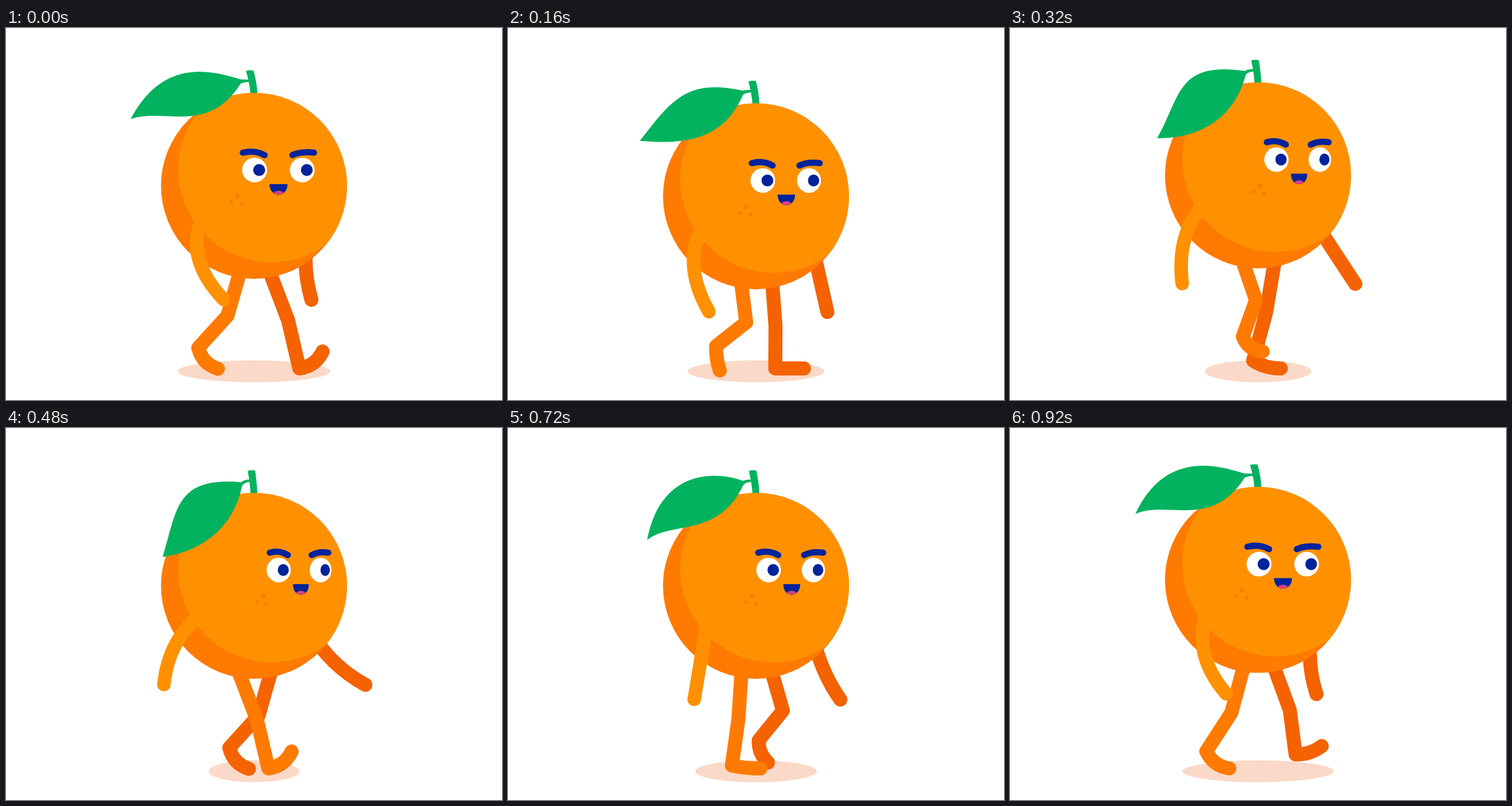
These frames come from a looping animation (864x648 px, 0.96 s). An HTML page:

```html
<!DOCTYPE html>
<html lang="en">
<head>
<meta charset="utf-8">
<title>Walking orange</title>
<style>
html, body { margin: 0; width: 100%; height: 100%; overflow: hidden; background: #fff; }
svg { display: block; width: 100vw; height: 100vh; }
.limb { fill: none; stroke-width: 24.4; stroke-linecap: round; stroke-linejoin: round; }
.far { stroke: #f56200; }
.near { stroke: #ff7a00; }
.arm { stroke: #ff9100; stroke-width: 23.6; }
.brow { fill: none; stroke: #00239c; stroke-width: 10.8; stroke-linecap: round; }
.navy { fill: #00239c; }
.leaf { fill: #03b25e; }
.dot { fill: #ff7a00; }
</style>
</head>
<body>
<svg viewBox="0 0 864 648">
  <defs>
    <clipPath id="skin"><circle cx="432" cy="273.5" r="162"/></clipPath>
    <clipPath id="lips"><path id="lipShape"/></clipPath>
  </defs>
  <ellipse id="shadow" cx="432" cy="598" ry="19" fill="#fbd9c8"/>
  <path id="farArm" class="limb far"/>
  <path id="farLeg" class="limb far"/>
  <path id="nearLeg" class="limb near"/>
  <g id="body">
    <path id="stem" class="leaf"/>
    <circle cx="432" cy="273.5" r="162" fill="#ff7a00"/>
    <circle cx="462" cy="245" r="162" fill="#ff9100" clip-path="url(#skin)"/>
    <path id="leaf" class="leaf"/>
    <ellipse id="eyeL" cy="246" ry="21.5" fill="#fff"/>
    <ellipse id="eyeR" cy="246" ry="21.5" fill="#fff"/>
    <ellipse id="pupilL" class="navy" cy="246" ry="10.4"/>
    <ellipse id="pupilR" class="navy" cy="246" ry="10.4"/>
    <path id="browL" class="brow"/>
    <path id="browR" class="brow"/>
    <path id="mouth" class="navy"/>
    <ellipse id="tongue" cy="289.5" ry="7.5" fill="#d4437c" clip-path="url(#lips)"/>
    <circle id="dot1" class="dot" cy="291.5" r="4"/>
    <circle id="dot2" class="dot" cy="302.3" r="2.8"/>
    <circle id="dot3" class="dot" cy="304.5" r="3.5"/>
    <path id="nearArm" class="limb arm"/>
  </g>
</svg>
<script>
const STEP = 40, CYCLE = 24, HALF = CYCLE / 2, GROUND = 593;
const { sin, cos, abs, max, hypot, asin, PI } = Math;
const RAD = PI / 180;
const $ = id => document.getElementById(id);
const set = (id, attrs) => {
  for (const k in attrs) $(id).setAttribute(k, attrs[k]);
};
const path = (id, d) => set(id, { d });

const lerp = (a, b, u) => a + (b - a) * u;
const ease = u => u * u * (3 - 2 * u);
// Rises 0 to 1 over half the period, then falls back.
const pingPong = (n, period) => 1 - abs(1 - (n % period) / (period / 2));

// Lowest a quarter of a step after each contact, highest half a step later.
const bob = n => lerp(22.8, -20, ease(pingPong(n + 9, HALF)));

// Ankle lift, foot angle and foot length: swing first, then stance.
function foot(n) {
  if (n < HALF) {
    const u = n / HALF, arc = sin(PI * u);
    return {
      lift: 36 * (1 - u) + 44 * sin(PI * u * u),
      angle: (47 - 83 * u + 62 * arc + 10 * sin(2 * PI * u)) * RAD,
      len: 50 - 8 * arc
    };
  }
  const lift = 36 * max(0, (n - 16) / 8) ** 1.4;
  return { lift, angle: asin(lift / 50) - 36 * RAD * max(0, 1 - (n - HALF) / 3), len: 50 };
}

function drawLeg(id, time, dx, dy) {
  const n = time % CYCLE;
  const { lift, angle, len } = foot(n);
  const hx = 406.5 + dx, hy = 427 + dy;
  const ax = 335 + dx + 122 * pingPong(n, CYCLE) ** (n < HALF ? 1.35 : 1.15);
  const ay = GROUND - lift;

  const fold = (1 + cos((n - 4.5) * 2 * PI / CYCLE)) / 2;
  const bulge = (3 + 30 * fold * fold) / hypot(ax - hx, ay - hy);
  const kx = (hx + ax) / 2 + bulge * (ay - hy);
  const ky = (hy + ay) / 2 - bulge * (ax - hx);

  const c = cos(angle), s = sin(angle), curl = 14 * abs(sin(2 * angle));
  const bend = [ax + len / 2 * c - curl * s, ay + len / 2 * s + curl * c];
  path(id, `M${hx} ${hy}L${kx} ${ky}L${ax} ${ay}Q${bend} ${ax + len * c} ${ay + len * s}`);
}

// s: swing position 0 to 1, v: swing speed -1 to 1; elbows trail behind.
function drawArms(s, v, dy) {
  const vv = v * v, drop = 24.7 * s - 50.7 * s * s;
  const near = [306 - 22 * s - 20 * v + 22 * vv, 395 - 33 * s - 8.5 * v + 9 * vv];
  path('nearArm', `M${347 - 3 * v} 318Q${near} ${379 - 114.6 * s + 10.6 * s * s} ${471.5 + drop}`);
  const far = [514 + 50 * s + 6 * v + 11 * vv, 409 + 3 * s - 8.6 * v + 4 * vv + dy];
  path('farArm', `M528 ${350 + dy}Q${far} ${532 + 94 * s} ${472 + drop + dy}`);
}

function drawLeaf(n, s, v) {
  const x = 408 + 2 * s, y = 88 + 5 * s, top = 418 + 3 * s;
  const tilt = (20 + 23.5 * s) * RAD, c = cos(tilt), k = sin(tilt);
  const flap = sin(PI / 2 * sin((n - 2) * 2 * PI / CYCLE));
  // Point at a distance along the midrib and above it.
  const at = (along, up) => `${x - along * c - up * k} ${y + along * k - up * c} `;
  const upper = at(60 + 24 * flap, 33 + 54 * s + 15 * v) + at(115, 61 - 28 * flap);
  const lower = at(142, -17 - 24 * flap) + at(79 - 10 * flap, -73 + 20 * s);
  path('leaf', `M425 88.5Q416 88 ${x} ${y}C${upper}${at(203 - 14 * s, 0)}`
    + `C${lower}${x + 1} ${y + 7}Q415 92.5 425 92.5Z`);
  path('stem', `M${top} 73.5Q${top + 6} 71.5 ${top + 13} 72.5Q437 92 438 114H426Q${424 + s} 92 ${top} 73.5Z`);
}

function drawFace(s) {
  const mix = (a, b) => lerp(a, b, s);
  set('eyeL', { cx: mix(433, 475), rx: mix(21.7, 21) });
  set('eyeR', { cx: mix(516, 548), rx: mix(21.5, 19) });
  set('pupilL', { cx: mix(441, 483), rx: mix(10.5, 9.6) });
  set('pupilR', { cx: mix(524, 556), rx: mix(10.3, 8.2) });
  path('browL', `M${mix(412.5, 459.5)} 215.8Q${mix(433, 476)} 210.5 ${mix(450.5, 491)} 220`);
  path('browR', `M${mix(499, 532.5)} 220Q${mix(514, 545)} 213 ${mix(536.5, 561.5)} 215.8`);
  const l = mix(459, 500), r = mix(490.5, 527.5), c = (l + r) / 2;
  const lips = `M${l} 270.5H${r}C${r} 282 ${c + 8} 289 ${c} 289S${l} 282 ${l} 270.5Z`;
  path('mouth', lips);
  path('lipShape', lips);
  set('tongue', { cx: c, rx: mix(10, 9) });
  set('dot1', { cx: mix(403, 447) });
  set('dot2', { cx: mix(392.5, 436.5) });
  set('dot3', { cx: mix(411.5, 453) });
}

function draw(ms) {
  const n = Math.floor(ms / STEP + 0.01) % CYCLE;
  const s = ease(pingPong(n, CYCLE)), v = sin(n * 2 * PI / CYCLE);
  const dy = bob(n);
  set('body', { transform: `translate(0 ${dy})` });
  set('shadow', { rx: 133 - 54 * s });
  drawLeg('farLeg', n + HALF, 54, dy);
  drawLeg('nearLeg', n, 0, dy);
  drawArms(s, v, dy);
  drawLeaf(n, s, v);
  drawFace(s);
}

const start = performance.now();
function tick() {
  draw(performance.now() - start);
  requestAnimationFrame(tick);
}
tick();
</script>
</body>
</html>
```
